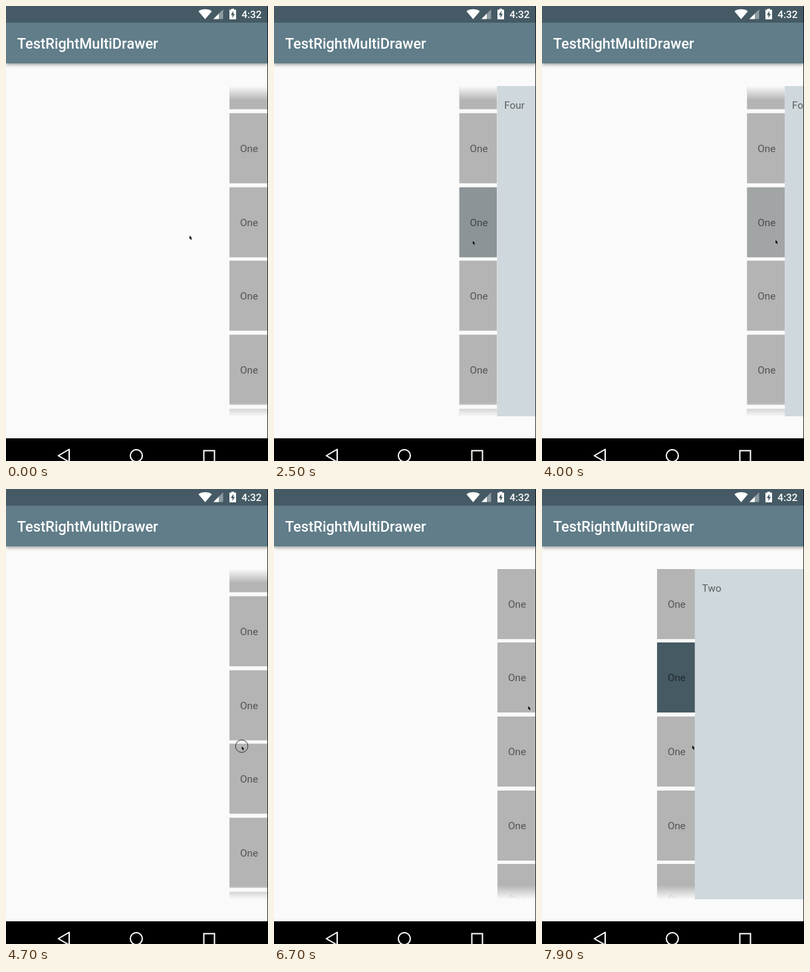
These frames come from a looping animation (394x682 px, 8 s). An HTML page:

```html
<!DOCTYPE html>
<html lang="en">
<head>
<meta charset="utf-8">
<title>Right drawer demo</title>
<style>
  html, body { margin: 0; width: 100%; height: 100%; overflow: hidden; }
  body { background: #fafafa; font: 15.3px Roboto, sans-serif; }
  #stage { position: relative; width: 394px; height: 682px; overflow: hidden; background: #fafafa; }
  #stage div, svg { position: absolute; }
  .bar { left: 0; width: 394px; }
  #app { top: 25px; height: 61px; background: #607d89; box-shadow: 0 2px 5px rgba(0, 0, 0, .38); }
  #status { top: 0; height: 25px; background: #455a64; }
  #nav { top: 647.5px; height: 35px; background: #000; }
  #title, #clock { color: #fff; font-weight: 500; white-space: nowrap; }
  #title { left: 16.8px; top: 42px; font-size: 21.8px; line-height: 30px; }
  #clock { left: 354.3px; top: .5px; line-height: 25px; }
  #drawer { left: 0; top: 119.5px; width: 394px; height: 495px; }
  #list { left: 0; top: 0; width: 57px; height: 495px; overflow: hidden; }
  .tab { left: 0; width: 57px; height: 105px; line-height: 106px; text-indent: 16px;
    background: #b4b4b4; color: rgba(0, 0, 0, .54); }
  .fade { left: 0; width: 57px; height: 21px; }
  #fadeTop { top: 0; background: linear-gradient(#fafafa, rgba(250, 250, 250, 0)); }
  #fadeEnd { bottom: 0; background: linear-gradient(rgba(250, 250, 250, 0), #fafafa); }
  #panel { left: 57px; top: 0; width: 222px; height: 495px; background: #cfd8dc; }
  #label { left: 10.8px; top: 17.3px; line-height: 24px; color: rgba(0, 0, 0, .57); }
  #thumb { right: 1px; top: 119.5px; width: 4.5px; height: 317px; background: rgba(0, 0, 0, .31); }
  #edge { right: 0; top: 0; width: 1px; height: 682px; background: rgba(0, 0, 0, .8); }
  svg { left: 0; top: 0; width: 394px; height: 682px; }
</style>
</head>
<body>
<div id="stage">
  <div id="drawer">
    <div id="list">
      <div id="tabs"></div>
      <div class="fade" id="fadeTop"></div>
      <div class="fade" id="fadeEnd"></div>
    </div>
    <div id="panel"><div id="label">Four</div></div>
  </div>
  <div id="thumb"></div>
  <div class="bar" id="app"></div>
  <div class="bar" id="status"></div>
  <div id="title">TestRightMultiDrawer</div>
  <div id="clock">4:32</div>
  <div class="bar" id="nav"></div>
  <svg viewBox="0 0 394 682">
    <g fill="#fff">
      <path d="M289.5 8C294 3.7 305 3.7 309.5 8L299.5 19.7Z"/>
      <path d="M326.5 5V19.5H312Z" opacity=".4"/>
      <path d="M320 11.5V19.5H312Z"/>
      <path d="M336 5.5h3V4h4v1.5h3V20h-10Z"/>
    </g>
    <path d="M342 7.5L338 13.5H340.5V18L344 12H342Z" fill="#455a64"/>
    <g fill="none" stroke="#fff" stroke-width="2">
      <path d="M78.7 674L95 664.5V683.5Z" stroke-linejoin="round"/>
      <circle cx="196" cy="674" r="9"/>
      <rect x="297.5" y="666.5" width="16" height="17"/>
    </g>
    <g id="pointer">
      <circle id="press" r="9.3" fill="none" stroke="#333"/>
      <path d="M0 0V5.6L1.3 4.5L2.3 6.8L3.3 6.3L2.4 4.2H4Z" stroke="#fff" stroke-width=".8" stroke-opacity=".6" paint-order="stroke"/>
    </g>
  </svg>
  <div id="edge"></div>
</div>
<script>
  const LOOP = 8000, STEP = 100;
  const CLOSED = 336, OPEN = 172;
  const PITCH = 110.7, TABS = 7, VIEW = 495, FADE = 21;
  const MAX_SCROLL = PITCH * TABS - VIEW;

  const initial = { x: 276, y: 344, drawer: CLOSED, scroll: 180.3 };

  // Each move eases the named values from wherever they were.
  const moves = [
    { from: 0, to: 500, x: 362 },
    { from: 1600, to: 1700, y: 342 },
    { from: 2100, to: 3000, x: 182, y: 370, drawer: OPEN },
    { from: 3000, to: 3300, x: 215, y: 328 },
    { from: 3440, to: 4300, x: 379, y: 355, drawer: CLOSED },
    { from: 4300, to: 4600, x: 354.5, y: 385.5 },
    { from: 4700, to: 5500, x: 357, y: 257, scroll: MAX_SCROLL },
    { from: 5570, to: 6100, x: 361, y: 532, scroll: 0 },
    { from: 6200, to: 7000, x: 388, y: 270 },
    { from: 7100, to: 8000, x: 225, y: 385, drawer: OPEN }
  ];

  const $ = id => document.getElementById(id);
  const clamp = v => Math.max(0, Math.min(1, v));
  const ease = p => p < .5 ? 4 * p ** 3 : 1 - 4 * (1 - p) ** 3;
  const between = (t, a, b) => t >= a && t < b;

  function stateAt(t) {
    const state = { ...initial };
    for (const { from, to, ...goal } of moves) {
      const p = ease(clamp((t - from) / (to - from)));
      for (const key in goal) state[key] += (goal[key] - state[key]) * p;
    }
    return state;
  }

  const tabs = Array.from({ length: TABS }, (_, i) => {
    const tab = document.createElement('div');
    tab.className = 'tab';
    tab.textContent = 'One';
    tab.style.top = i * PITCH + 'px';
    $('tabs').append(tab);
    return tab;
  });

  function draw(t) {
    const { x, y, drawer, scroll } = stateAt(t);
    const open = (CLOSED - drawer) / (CLOSED - OPEN);
    const active = t < 5000 ? 3 : 1;

    $('drawer').style.transform = `translateX(${drawer}px)`;
    $('tabs').style.transform = `translateY(${-scroll}px)`;
    $('label').textContent = active === 3 ? 'Four' : 'Two';
    tabs.forEach((tab, i) => {
      const mix = i === active ? open * 100 : 0;
      tab.style.background = `color-mix(in srgb, #455a64 ${mix}%, #b4b4b4)`;
    });
    $('fadeTop').style.opacity = clamp(scroll / FADE);
    $('fadeEnd').style.opacity = clamp((MAX_SCROLL - scroll) / FADE);

    $('thumb').style.transform = `translateY(${scroll * VIEW / (PITCH * TABS)}px)`;
    $('thumb').style.opacity = t < 4800 ? 0 : clamp((6650 - t) / 250);

    const pressed = between(t, 800, 900) || between(t, 1700, 1900) || between(t, 4600, 6200);
    $('pointer').setAttribute('transform', `translate(${x} ${y})`);
    $('press').style.opacity = pressed ? 1 : 0;
  }

  const start = performance.now();
  function tick() {
    const t = (performance.now() - start) % LOOP;
    draw(Math.floor(t / STEP) * STEP);
    requestAnimationFrame(tick);
  }
  tick();
</script>
</body>
</html>
```
